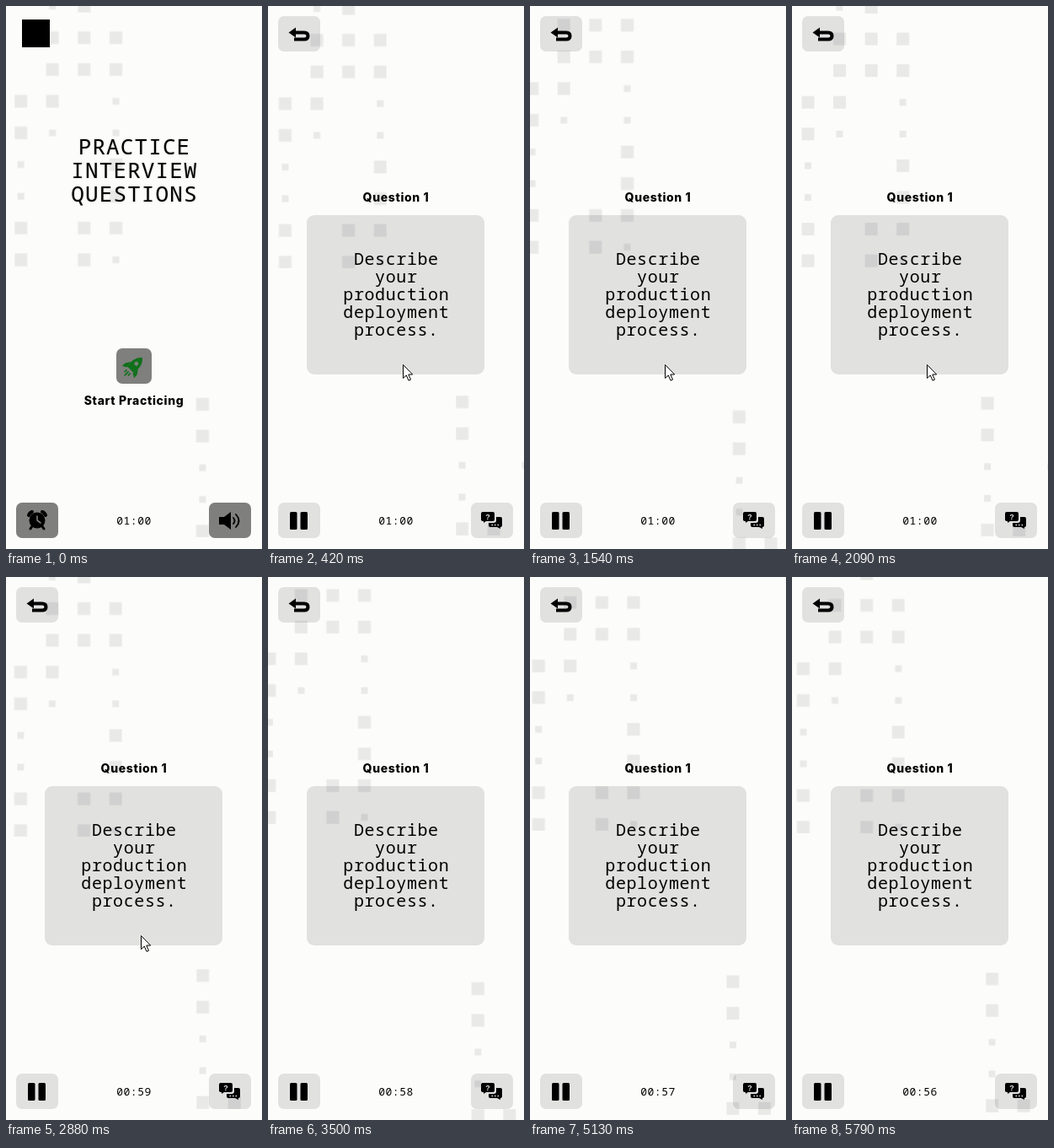
Recreate the animation shown at these times as an HTML page. Size 304 by 644 pixels, loop 5.83 s.

```html
<!DOCTYPE html>
<html lang="en">
<head>
<meta charset="utf-8">
<title>Interview practice</title>
<style>
  html, body { margin: 0; width: 100%; height: 100%; overflow: hidden; background: #fcfcfa; }
  svg { display: block; width: 100vw; height: 100vh; }
  text { text-anchor: middle; white-space: pre; }
  .mark { fill: #e9e9e8; }
  .pane { fill: #e4e4e5; mix-blend-mode: multiply; }
  .dark { fill: #7f7f7d; }
  .title { font: 500 26px "Noto Sans Mono", monospace; letter-spacing: 1.1px; text-shadow: 0 0 2px #bbb; }
  .ask { font: 400 20px "Noto Sans Mono", monospace; letter-spacing: .6px; }
  .label { font: 800 14px Inter, sans-serif; letter-spacing: .65px; }
  .clock { font: 400 13px "Noto Sans Mono", monospace; letter-spacing: .5px; }
  .line { fill: none; stroke: #000; stroke-linecap: round; stroke-linejoin: round; }
</style>
</head>
<body>
<svg viewBox="0 0 304 644" preserveAspectRatio="none">
  <rect width="304" height="644" fill="#fcfcfa"/>
  <g id="left" class="mark"></g>
  <g id="right" class="mark"></g>

  <g id="home">
    <rect x="19" y="16" width="33" height="33"/>
    <g class="title">
      <text x="152.5" y="176">PRACTICE</text>
      <text x="152.5" y="204">INTERVIEW</text>
      <text x="152.5" y="232">QUESTIONS</text>
    </g>
    <g class="dark">
      <rect x="131" y="406" width="42" height="42" rx="7"/>
      <rect x="12" y="589" width="50" height="42" rx="7"/>
      <rect x="241" y="589" width="50" height="42" rx="7"/>
    </g>
    <!-- rocket -->
    <g transform="translate(152 427) rotate(45)" fill="#10701a">
      <path d="M0-14C6-9 7-2 5 6H-5C-7-2-6-9 0-14Z"/>
      <path d="M-6-1L-10 5V10L-5 7ZM6-1L10 5V10L5 7Z"/>
      <circle class="dark" cy="-4" r="2.4"/>
      <path d="M-3 9V13M0 9V16M3 9V13" stroke="#10701a" stroke-width="1.6"/>
    </g>
    <text class="label" x="152" y="473">Start Practicing</text>
    <!-- alarm -->
    <g transform="translate(37 610)">
      <circle r="9.5"/>
      <path class="line" stroke-width="4" d="M-10-6Q-9-9-6-10M10-6Q9-9 6-10"/>
      <path class="line" stroke-width="3" d="M-6 7L-8 10M6 7L8 10"/>
      <path class="line" style="stroke:#7f7f7d" stroke-width="1.6" d="M0-5V0L4 3"/>
    </g>
    <!-- speaker -->
    <path d="M253 606H259L267 600V621L259 615H253Z"/>
    <path class="line" stroke-width="1.8" d="M270 607Q273 610.5 270 614M273 603Q280 610.5 273 618"/>
  </g>

  <g id="quiz">
    <g class="pane">
      <rect x="12" y="12" width="50" height="42" rx="7"/>
      <rect x="46" y="248" width="211" height="189" rx="9"/>
      <rect x="12" y="589" width="50" height="42" rx="7"/>
      <rect x="241" y="589" width="50" height="42" rx="7"/>
    </g>
    <!-- back -->
    <path d="M24.5 31.5L33 25.5V37.5Z"/>
    <path class="line" stroke-width="4" style="stroke-linecap:butt" d="M32 31.5H43Q47.5 31.5 47.5 35.5T43 39.5H31"/>
    <text class="label" x="152" y="232">Question 1</text>
    <g class="ask">
      <text x="152.3" y="307">Describe</text>
      <text x="152.3" y="328">your</text>
      <text x="152.3" y="349">production</text>
      <text x="152.3" y="370">deployment</text>
      <text x="152.3" y="391">process.</text>
    </g>
    <!-- pause -->
    <rect x="26" y="600" width="8.5" height="21" rx="1.5"/>
    <rect x="38.5" y="600" width="8.5" height="21" rx="1.5"/>
    <!-- chat -->
    <path d="M255 600H267Q269 600 269 602V609Q269 611 267 611H259L256 613V611Q253 611 253 609V602Q253 600 255 600Z"/>
    <path d="M271 606H276Q278 606 278 608V616Q278 618 276 618V620L272 618H264Q262 618 262 616V613H268Q271 613 271 610Z"/>
    <text x="261" y="609" fill="#e2e2e2" style="font:700 9px 'Liberation Sans',sans-serif">?</text>
    <path d="M265.5 615.5H267M269 615.5H270.5M272.5 615.5H274" stroke="#e2e2e2" stroke-width="1.4"/>
  </g>

  <text id="clock" class="clock" x="152" y="615">01:00</text>
  <path id="cursor" d="M160.5 425.5V441.5L164.3 438L167 444.2L169.5 443.1L166.8 437H171.7Z" fill="#fff" stroke="#000"/>
</svg>
<script>
const LOOP = 5830, ENTER = 90, FIRST_TICK = 2300, CURSOR_OFF = 3500;
const SWAY = 995, LOW_POINT = 1435;
const $ = id => document.getElementById(id);

// B: large square, i: small square
function scatter(group, x, y, columns) {
  columns.forEach((column, c) => [...column].forEach((kind, r) => {
    if (kind === '.') return;
    const size = kind === 'B' ? 15 : 8;
    const mark = document.createElementNS('http://www.w3.org/2000/svg', 'rect');
    mark.setAttribute('x', x + 37.6 * c - size / 2);
    mark.setAttribute('y', y + 37.6 * r - size / 2);
    mark.setAttribute('width', size);
    mark.setAttribute('height', size);
    group.append(mark);
  }));
}

// Opposite diagonal drifts, eased and alternating
function drift(group, sign) {
  const at = d => ({ transform: `translate(${sign * d}px, ${sign * d}px)` });
  const motion = group.animate([{ ...at(-17.5), easing: 'ease' }, at(2.5)],
    { duration: SWAY, iterations: Infinity, direction: 'alternate' });
  motion.pause();
  return motion;
}

scatter($('left'), 18, 0.5, ['...BBiiBB', 'iBBBi....', 'BBB....BB', '.BBiiBBBi']);
scatter($('right'), 233, 472, ['BBiiB', '....B', '..i..']);
const drifts = [drift($('left'), 1), drift($('right'), -1)];

const show = (id, on) => { $(id).style.display = on ? '' : 'none'; };
const start = performance.now();

function draw(now) {
  const t = Math.max(0, now - start) % LOOP;
  drifts.forEach(d => { d.currentTime = t + 2 * SWAY - LOW_POINT; });
  show('home', t < ENTER);
  show('quiz', t >= ENTER);
  show('cursor', t >= ENTER && t < CURSOR_OFF);
  const ticks = t < FIRST_TICK ? 0 : 1 + Math.floor((t - FIRST_TICK) / 1000);
  $('clock').textContent = ticks ? `00:${60 - ticks}` : '01:00';
  requestAnimationFrame(draw);
}
draw(start);
</script>
</body>
</html>
```
